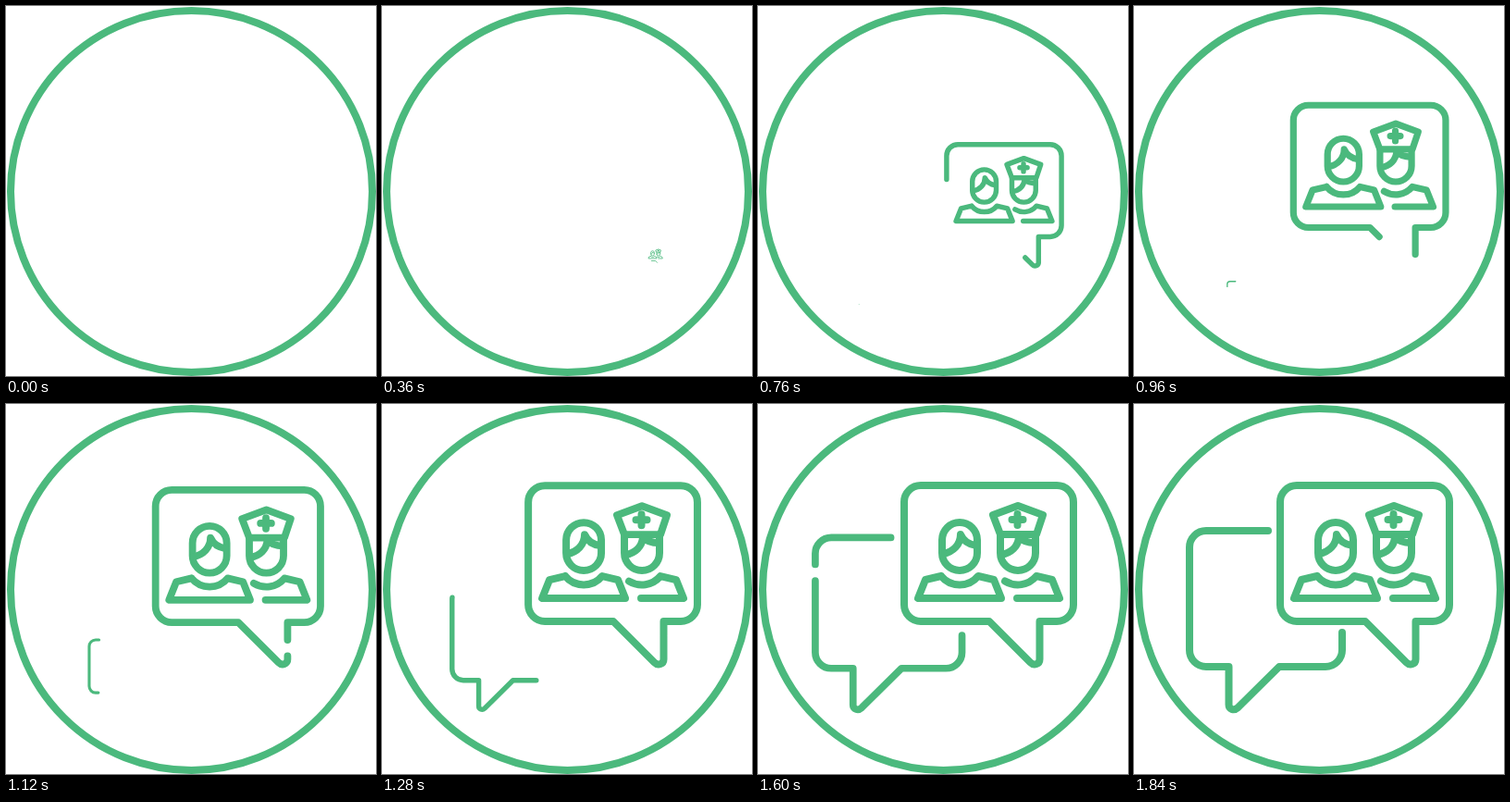
Write an HTML page that moves like this. It is 400 px wide and 400 px high and loops after 2640 ms.

```html
<!DOCTYPE html>
<html lang="en">
<head>
<meta charset="utf-8">
<title>Consultation</title>
<style>
html, body { margin: 0; width: 100%; height: 100%; overflow: hidden; background: #fff; }
svg { display: block; width: 100%; height: 100%; }
</style>
</head>
<body>
<svg viewBox="0 0 400 400" fill="none" stroke="#4bb97d" stroke-width="8" stroke-linecap="round" stroke-linejoin="round">
  <circle cx="200.5" cy="200.5" r="195.5"/>
  <g id="reply">
    <path pathLength="1" d="M145 137H78A18 18 0 0 0 60 155V266A18 18 0 0 0 78 284H102.500V325C102.500 330 108 332 112 328.500L157 284H207A18 18 0 0 0 225 266V247"/>
  </g>
  <g id="talk">
    <path pathLength="1" d="M304.500 250V235H323A18 18 0 0 0 341 217V106A18 18 0 0 0 323 88H176A18 18 0 0 0 158 106V217A18 18 0 0 0 176 235H250L294.500 279.500C298.500 283.500 304.500 281 304.500 276Z"/>
    <!-- patient -->
    <path d="M199 147A19 19 0 0 1 237 147V161A19 19 0 0 1 199 161Z"/>
    <path d="M200 162C211 160 219 152 219 141C222 148 228 152 236 153"/>
    <path d="M198 186L181 190L173 210H263L255 190L238 186C228 198.500 208 198.500 198 186"/>
    <!-- nurse -->
    <path d="M254 120L281 110L308 120L301 141H262ZM280.500 119V131M274.500 125H286.500"/>
    <path d="M262 141V161A19 19 0 0 0 300 161V141"/>
    <path d="M263 163C274 161 281 154 282 144C286 148 292 150 299 150"/>
    <path d="M267 191.500C278 198 292 196.500 301 186L318 190L326 210H280"/>
  </g>
</svg>
<script>
const LOOP = 2640, STEP = 40, GROW = 1320;

const bubbles = [
  { id: "talk", delay: 0, x: 300.8, y: 280, turn: -0.25 },
  { id: "reply", delay: 520, x: 109, y: 330, turn: 0.025 }
].map(b => {
  const group = document.getElementById(b.id);
  return { ...b, group, outline: group.querySelector("path") };
});

// Cubic bezier easing (0.6, 0, 0.4, 1), solved by bisection.
function ease(u) {
  if (u <= 0) return 0;
  if (u >= 1) return 1;
  let low = 0, high = 1, p = 0.5;
  for (let i = 0; i < 24; i++) {
    p = (low + high) / 2;
    const q = 1 - p;
    const x = 1.8 * q * q * p + 1.2 * q * p * p + p * p * p;
    if (x < u) low = p; else high = p;
  }
  return p * p * (3 - 2 * p);
}

// The outline is trimmed to the scale while it slides a quarter turn.
function drawBubble({ group, outline, delay, x, y, turn }, time) {
  const s = ease((time - delay) / GROW);
  group.style.display = s < 0.006 ? "none" : "";
  group.setAttribute("transform", `translate(${x} ${y}) scale(${s}) translate(${-x} ${-y})`);
  if (s < 1) {
    outline.setAttribute("stroke-dasharray", `${s} ${1 - s}`);
    outline.setAttribute("stroke-dashoffset", 1 - (turn + 0.25 * s));
  } else {
    outline.removeAttribute("stroke-dasharray");
  }
}

function render(time) {
  const t = Math.floor((time % LOOP) / STEP) * STEP;
  bubbles.forEach(b => drawBubble(b, t));
}

const start = performance.now();
function tick() {
  render(performance.now() - start);
  requestAnimationFrame(tick);
}
tick();
</script>
</body>
</html>
```
